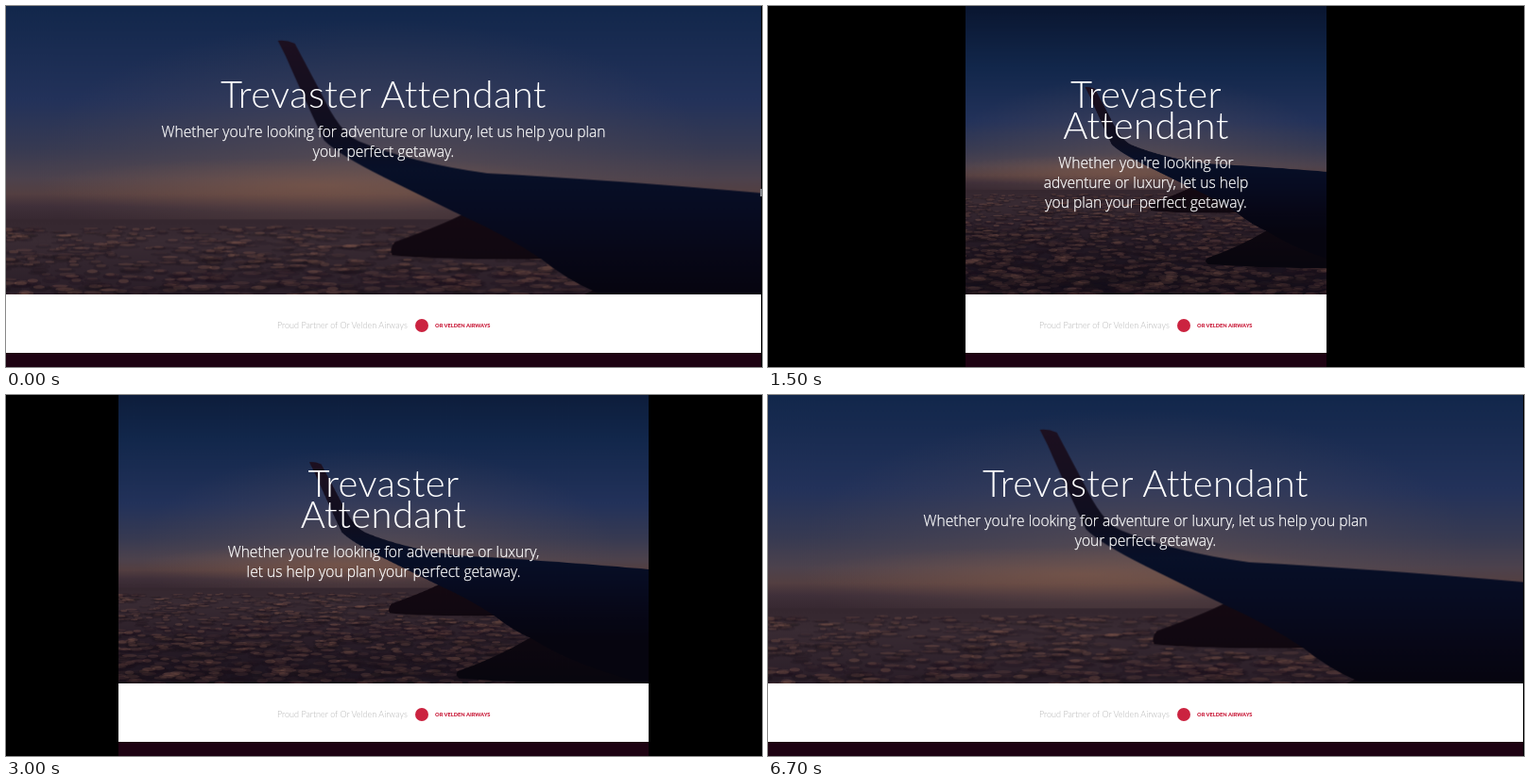
Write an HTML page with a canvas that moves like this. It is 800 px wide and 383 px high and loops after 6.8 s.

```html
<!DOCTYPE html>
<html lang="en">
<head>
<meta charset="utf-8">
<title>Responsive travel page</title>
<style>
  html, body { margin: 0; width: 100%; height: 100%; overflow: hidden; background: #000; }
  #stage { position: relative; width: 800px; height: 383px; overflow: hidden; background: #000; }
  #page { position: absolute; top: 0; height: 383px; overflow: hidden; background: #1e0312; }
  #hero { position: relative; height: 306px; overflow: hidden; }
  #photo { position: absolute; }
  #copy { position: absolute; top: 77px; left: 50%; width: calc(60% + 3px);
    transform: translateX(-50%); color: #fff; text-align: center; }
  h1 { margin: 0 0 13px; font: 300 40px/33px Lato, sans-serif; letter-spacing: .4px; }
  p { margin: 0; font: 300 15.6px/21px "Open Sans", sans-serif; -webkit-text-stroke: .25px #fff; }
  #band { height: 62px; background: #fff; }
  #partner { position: absolute; left: 0; top: 306px; width: 800px; height: 62px; }
  #partner * { position: absolute; white-space: nowrap; }
  #note { left: 287px; font: 300 9px/66px Lato, sans-serif; color: #b4b4b4; }
  #mark { left: 433px; top: 26px; width: 14px; height: 14px; border-radius: 50%; background: #cb2340; }
  #brand { left: 454px; font: 900 5.7px/66px Lato, sans-serif; color: #cb2340; }
  #grip { position: absolute; top: 194px; width: 2px; height: 8px; background: #85878c; }
  #arrow { position: absolute; left: 0; top: 0; }
</style>
</head>
<body>
<div id="stage">
  <div id="page">
    <div id="hero">
      <canvas id="photo" width="800" height="533"></canvas>
      <div id="copy">
        <h1>Trevaster Attendant</h1>
        <p>Whether you're looking for adventure or luxury, let us help you plan your perfect getaway.</p>
      </div>
    </div>
    <div id="band"></div>
  </div>
  <div id="partner">
    <span id="note">Proud Partner of Or Velden Airways</span>
    <i id="mark"></i>
    <span id="brand">OR VELDEN AIRWAYS</span>
  </div>
  <div id="grip"></div>
  <svg id="arrow" width="8" height="11"><path d="M.5 .5V8.5L2.4 6.8 3.7 9.7 4.9 9.1 3.6 6.3H6Z" fill="#111" stroke="#ddd" stroke-width=".7"/></svg>
</div>
<script>
const $ = id => document.getElementById(id);
const LOOP = 6800, HERO = 306, PHOTO_W = 800, PHOTO_H = 533;

let seed = 7;
const rand = () => (seed = (seed * 16807) % 2147483647) / 2147483647;

function paintPhoto() {
  const c = $('photo').getContext('2d');
  const top = -114, bottom = top + PHOTO_H, horizon = 230;
  c.translate(0, -top);

  const vertical = (y0, y1, stops) => {
    const g = c.createLinearGradient(0, y0, 0, y1);
    stops.forEach(([at, color]) => g.addColorStop(at, color));
    return g;
  };
  const shape = (path, fill) => { c.fillStyle = fill; c.fill(new Path2D(path)); };
  const glow = (x, y, r, flat, rgb, alpha) => {
    c.save();
    c.translate(x, y);
    c.scale(1, flat);
    const g = c.createRadialGradient(0, 0, 0, 0, 0, r);
    g.addColorStop(0, `rgba(${rgb},${alpha})`);
    g.addColorStop(1, `rgba(${rgb},0)`);
    c.fillStyle = g;
    c.fillRect(-r, -r, 2 * r, 2 * r);
    c.restore();
  };

  c.fillStyle = vertical(top, horizon, [
    [0, '#0a1630'], [.33, '#12274b'], [.62, '#23325a'], [.77, '#373a52'],
    [.86, '#4c424d'], [.91, '#543f41'], [.95, '#3f2f39'], [1, '#35272f']]);
  c.fillRect(0, top, PHOTO_W, horizon - top);
  glow(390, 165, 360, .42, '125,98,88', .36);
  glow(330, 190, 300, .1, '165,105,70', .3);

  c.fillStyle = vertical(horizon - 4, bottom, [
    [0, '#35272f'], [.12, '#392b33'], [.4, '#2a1e28'], [1, '#0f0b17']]);
  c.fillRect(0, horizon - 4, PHOTO_W, bottom - horizon + 4);

  // Cloud tops grow and fade toward the viewer.
  const count = 2200;
  for (let i = 0; i < count; i++) {
    const d = Math.pow(i / count, 1.25);
    const x = rand() * 840 - 20, y = horizon + 3 + d * 190 + rand() * 3;
    const rx = 4 + d * 11 + rand() * 9, ry = .8 + d * 4 + rand() * 1.4;
    const blob = (dy, k, color) => {
      c.fillStyle = color;
      c.beginPath();
      c.ellipse(x, y + dy, rx * k, ry * k, 0, 0, 7);
      c.fill();
    };
    blob(ry * .6, 1, `rgba(26,17,26,${.2 + d * .2})`);
    blob(-ry * .2, .65, `rgba(140,96,82,${rand() * (.42 - d * .25)})`);
  }

  const dark = vertical(220, 370, [[0, '#140912'], [1, '#08060e']]);
  shape('M483 221 Q462 232 412 250 Q406 257 409 264 Q450 269 567 268 L600 240Z', dark);
  shape('M624 300 Q570 332 512 352 Q507 358 514 363 Q640 372 800 370 V280Z', dark);
  shape(`M288 36 Q297 35 306 39 L334 92 Q354 135 374 143 Q430 166 510 177
         Q640 184 800 198 V372 Q690 345 624 303 Q594 290 567 268
         Q530 243 483 222 Q430 196 400 181 Q352 157 337 142 Q328 124 296 52Z`,
    vertical(36, 310, [[0, '#1d1020'], [.35, '#0f0e1f'], [.5, '#081028'],
      [.65, '#070c22'], [.85, '#070716'], [1, '#06050f']]));
}

const mix = (a, b, k) => a + (b - a) * k;
const clamp = k => Math.max(0, Math.min(1, k));

const widths = [[0, 799], [100, 765], [700, 523], [1000, 449], [1400, 417],
  [1800, 277], [2050, 268], [2250, 290], [2800, 441], [3400, 799], [LOOP, 799]];

function pageWidth(t) {
  const i = widths.findIndex(([at]) => at > t);
  const [t0, w0] = widths[i - 1], [t1, w1] = widths[i];
  return mix(w0, w1, (t - t0) / (t1 - t0));
}

function draw(t) {
  const w = Math.round(pageWidth(t)), left = Math.floor(400 - w / 2);
  $('page').style.left = left + 'px';
  $('page').style.width = w + 'px';
  $('partner').style.clipPath = `inset(0 ${800 - left - w}px 0 ${left}px)`;

  const s = Math.max(w / PHOTO_W, HERO / PHOTO_H);
  Object.assign($('photo').style, {
    width: PHOTO_W * s + 'px', height: PHOTO_H * s + 'px',
    left: (w - PHOTO_W * s) / 2 + 'px', top: (HERO - PHOTO_H * s) / 2 + 'px'
  });

  $('grip').style.left = left + w - 1 + 'px';
  $('grip').hidden = !(t < 100 || t > 1750 && t < 2100);

  const k = clamp((t - 4500) / 300), exit = clamp((t - 6350) / 150);
  $('arrow').style.transform =
    `translate(${mix(798, 586.5, k)}px, ${mix(194, -3, k) - exit * 12}px)`;
  $('arrow').style.visibility = k > 0 && exit < 1 ? 'visible' : 'hidden';
}

paintPhoto();
const start = performance.now();
function tick() {
  draw((performance.now() - start) % LOOP);
  requestAnimationFrame(tick);
}
tick();
</script>
</body>
</html>
```
